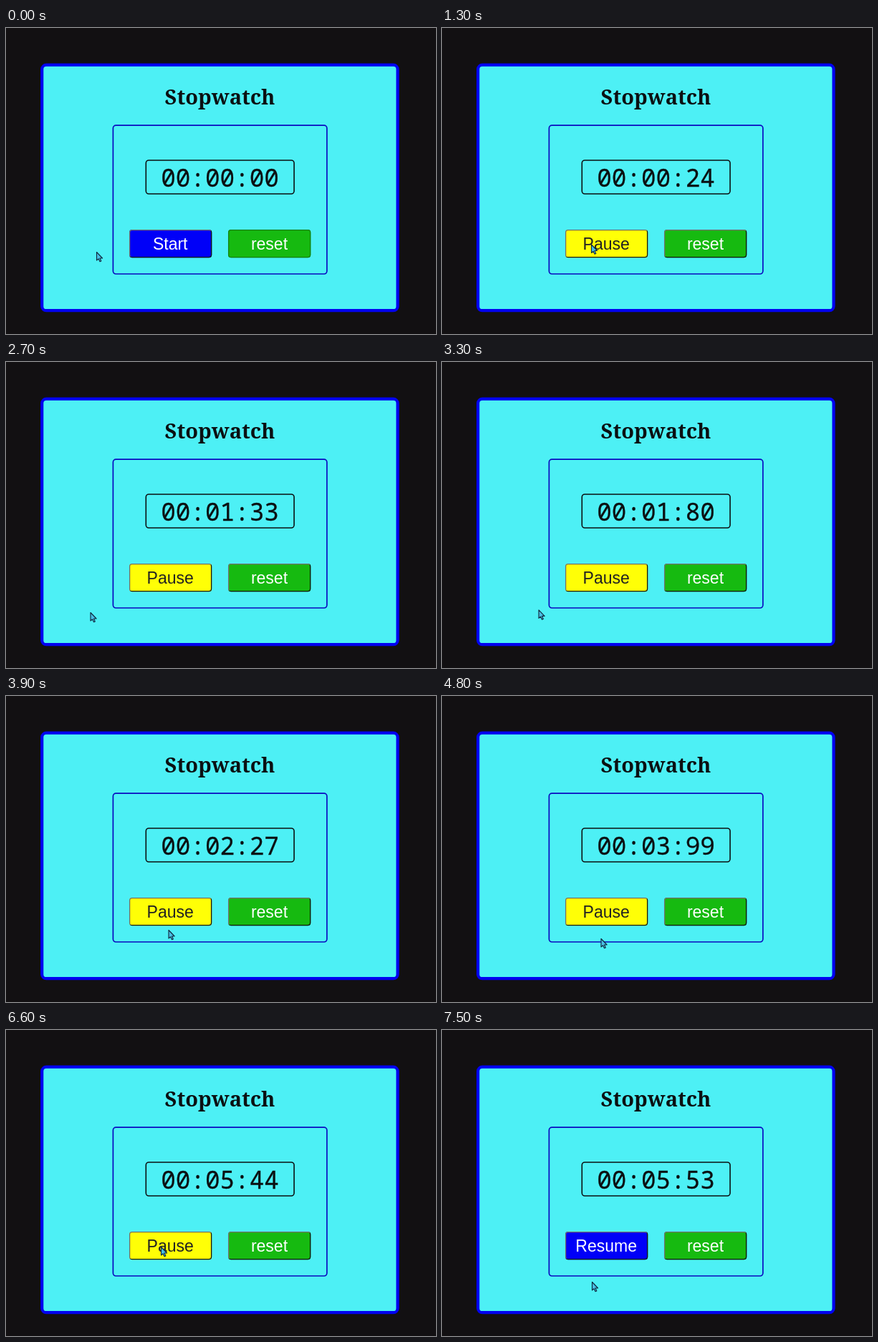
These frames come from a looping animation (600 by 428 pixels, 8 s). An HTML page:

```html
<!DOCTYPE html>
<html lang="en">
<head>
<meta charset="utf-8">
<title>Stopwatch</title>
<style>
  html, body { margin: 0; width: 100%; height: 100%; overflow: hidden; background: #121012; }
  svg { display: block; width: 600px; height: 428px; --ink: #0b1012; --hi: #70706c; --lo: #12180f; }
  rect { fill: none; }
  text { text-anchor: middle; }
  .title { font: 700 29px "Noto Serif", serif; fill: var(--ink); }
  .time { font: 34.3px "Noto Sans Mono", monospace; fill: var(--ink); stroke: var(--ink); stroke-width: .3px; }
  .label { font: 23px "Liberation Sans", Arial, sans-serif; fill: #fff; }
  .bevel { fill: none; stroke-width: 1.3; }
  .hi { stroke: var(--hi); }
  .lo { stroke: var(--lo); }
  .reset rect { fill: #16ba10; }
  .idle .reset { --hi: #15800f; --lo: #15800f; }
  .main rect { fill: #0000f8; }
  .running .main rect { fill: #ffff06; }
  .running .main text { fill: #222; }
</style>
</head>
<body>
<svg id="stage" class="idle" viewBox="0 0 600 428">
  <defs>
    <g id="bevel" class="bevel">
      <path class="hi" d="M1.5 38 Q.6 37 .6 35 V4 Q.6 .6 4 .6 H111 Q113 .6 114 1.5"/>
      <path class="lo" d="M114 1.5 Q114.6 2.5 114.6 4 V35 Q114.6 38.6 111 38.6 H4 Q2.5 38.6 1.5 38"/>
    </g>
  </defs>
  <rect x="50.2" y="51.7" width="496.3" height="343.5" rx="6" style="fill: #4df0f5" stroke="#0202f0" stroke-width="4.2"/>
  <text class="title" x="298.5" y="107">Stopwatch</text>
  <rect x="149.4" y="136.2" width="298.4" height="207.8" rx="4" stroke="#0a0ac0" stroke-width="1.7"/>
  <rect x="195.3" y="185" width="206.7" height="47" rx="4" stroke="#0b1012" stroke-width="1.6"/>
  <text class="time" id="time" x="298.5" y="222">00:00:00</text>
  <g class="main" transform="translate(172 282)">
    <rect width="115.2" height="39.2" rx="4"/>
    <use href="#bevel"/>
    <text class="label" id="label" x="57.2" y="27.6">Start</text>
  </g>
  <g class="reset" transform="translate(310 282)">
    <rect width="115.2" height="39.2" rx="4"/>
    <use href="#bevel"/>
    <text class="label" x="57.5" y="27.6">reset</text>
  </g>
  <path id="cursor" d="M.5 .5 V12 L3 9.8 L5 13.8 L6.8 13 L5 9 H8.6 Z" fill="#48bfe4" stroke="#10263c" stroke-width="1.1" stroke-linejoin="round"/>
</svg>
<script>
  const LOOP = 8000, STEP = 100, START = 1000, SKIP = 4400, STOP = 6705;
  const LABELS = { idle: "Start", running: "Pause", paused: "Resume" };
  const $ = id => document.getElementById(id);

  // Cursor rests: it arrives at, and leaves, x y at these times.
  const rests = [
    { from: 0, to: 200, x: 126, y: 313 },
    { from: 900, to: 1300, x: 208, y: 302.5 },
    { from: 2200, to: 3100, x: 117.5, y: 350 },
    { from: 3900, to: 3900, x: 226.5, y: 327 },
    { from: 4800, to: 4800, x: 221.5, y: 339 },
    { from: 5900, to: 5900, x: 223, y: 326 },
    { from: 6600, to: 7000, x: 216, y: 303 },
    { from: 7400, to: LOOP, x: 209, y: 352 }
  ];

  const mix = (a, b, k) => a + (b - a) * k;
  const smooth = k => k * k * (3 - 2 * k);
  const pad = n => String(n).padStart(2, "0");

  function cursorAt(t) {
    const i = rests.findIndex(r => t <= r.to);
    const b = rests[i], a = rests[i - 1];
    if (t >= b.from) return [b.x, b.y];
    const k = smooth((t - a.to) / (b.from - a.to));
    return [mix(a.x, b.x, k), mix(a.y, b.y, k)];
  }

  function countAt(t) {
    if (t < START) return 0;
    if (t < SKIP) return Math.floor(24 + (t - 1300) * .0783);
    return Math.floor(399 + (Math.min(t, STOP) - 4800) * .081);
  }

  function clock(n) {
    const s = Math.floor(n / 100);
    return [Math.floor(s / 60), s % 60, n % 100].map(pad).join(":");
  }

  function draw(now) {
    const t = Math.floor(now % LOOP / STEP) * STEP;
    const state = t < START ? "idle" : t < STOP ? "running" : "paused";
    $("stage").setAttribute("class", state);
    $("label").textContent = LABELS[state];
    $("time").textContent = clock(countAt(t));
    $("cursor").setAttribute("transform", `translate(${cursorAt(t)})`);
  }

  const begin = performance.now();
  function tick() {
    draw(performance.now() - begin);
    requestAnimationFrame(tick);
  }
  tick();
</script>
</body>
</html>
```
